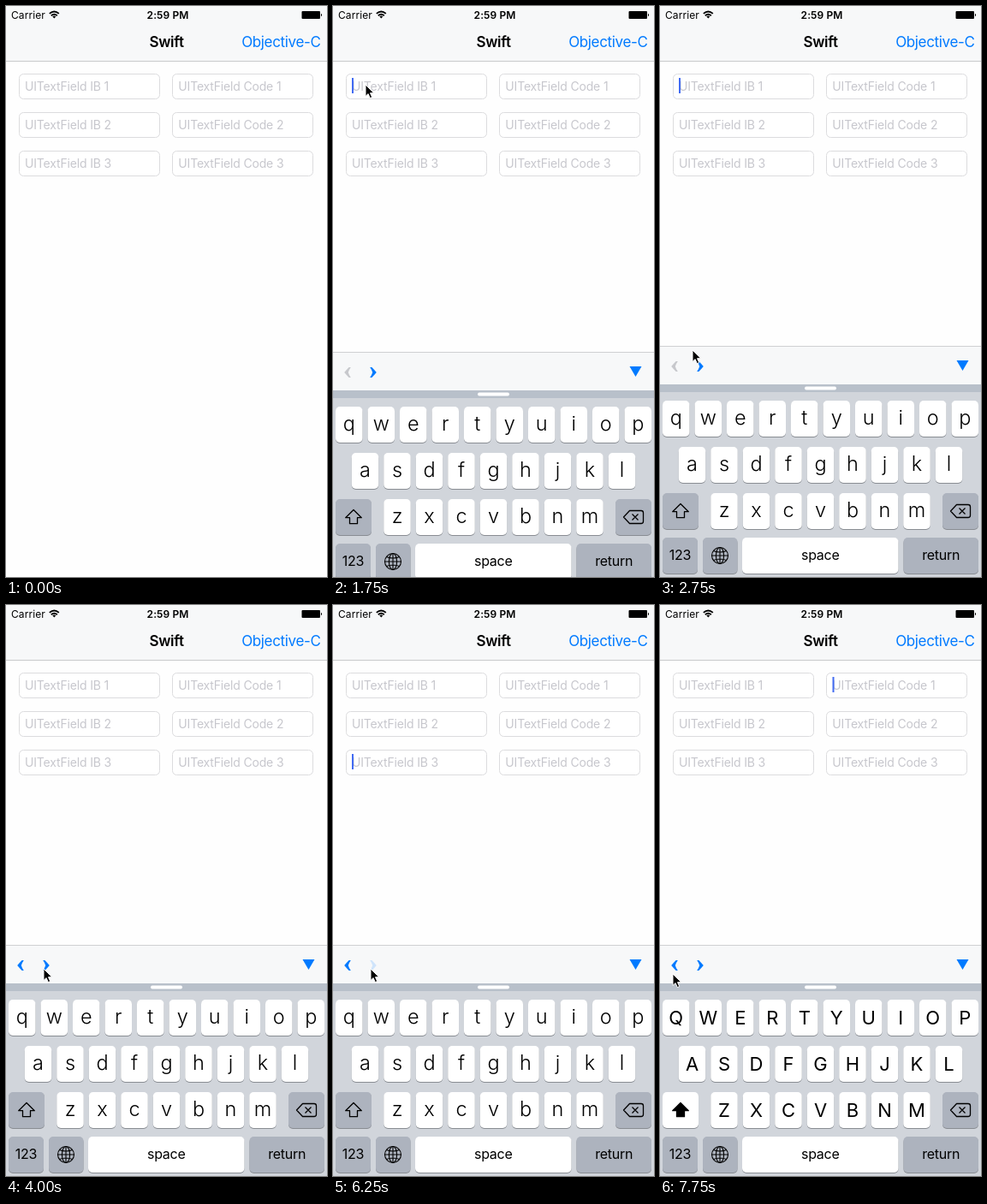
Write an HTML page that moves like this. It is 375 px wide and 667 px high and loops after 8 s.

```html
<!DOCTYPE html>
<html>
<head>
<meta charset="utf-8">
<style>
  html, body { margin: 0; width: 100%; height: 100%; overflow: hidden; background: #fff; }
  svg { display: block; width: 100vw; height: 100vh; font-family: Inter, Roboto, sans-serif; }
  .mid { text-anchor: middle; }
  .hint { font-size: 14px; letter-spacing: -.17px; fill: #c7c7cd; }
  .lower { font-size: 23.5px; font-weight: 300; }
  .upper { font-size: 22px; }
  .label { font-size: 16px; letter-spacing: -.25px; }
  .line { fill: none; stroke: #000; stroke-width: 1.3; stroke-linejoin: round; }
</style>
</head>
<body>
<svg viewBox="0 0 375 667">
  <rect width="375" height="667" fill="#fefefe"/>
  <rect width="375" height="64" fill="#f7f8f9"/>
  <rect y="64" width="375" height="1" fill="#c9cacb"/>
  <text x="6" y="14.5" font-size="12" letter-spacing=".1">Carrier</text>
  <g fill="none" stroke="#000" stroke-width="1.9">
    <path d="M50.8 8.9Q56.3 4.2 61.8 8.9M52.8 11.2Q56.3 8.3 59.8 11.2"/>
    <path d="M54.3 12.3Q56.3 10.8 58.3 12.3L56.3 14.5Z" fill="#000" stroke="none"/>
  </g>
  <text x="189" y="14.5" font-size="12" font-weight="600" letter-spacing=".1" class="mid">2:59 PM</text>
  <rect x="345.5" y="6" width="21.5" height="9" rx="1" fill="#000"/>
  <path d="M368 9h.6q1 1.5 0 3h-.6z"/>
  <text x="187.5" y="48" font-size="17" font-weight="600" letter-spacing="-.3" class="mid">Swift</text>
  <text x="367.5" y="48" font-size="17" letter-spacing="-.35" fill="#007aff" text-anchor="end">Objective-C</text>
  <g id="fields"></g>
  <rect id="caret" width="2" height="18" fill="#426bf2"/>
  <g id="board">
    <rect y="397" width="375" height="46" fill="#f7f8f9"/>
    <rect y="397" width="375" height="1" fill="#cfd0d2"/>
    <path id="prev" d="M18.6 415h2.2q-2.2 3.2-3 6q.8 2.800 3 6h-2.200q-3.200-3.400-5.400-6q2.200-2.600 5.400-6z"/>
    <path id="next" d="M45.400 415h-2.200q2.200 3.200 3 6q-.8 2.800-3 6h2.200q3.200-3.400 5.400-6q-2.200-2.600-5.400-6z"/>
    <path d="M346.500 414h14l-7 12z" fill="#007aff"/>
    <rect y="442" width="375" height="225" fill="#d1d5db"/>
    <rect y="442" width="375" height="9" fill="#b8c0ca"/>
    <rect x="169" y="444.500" width="37" height="4" rx="2" fill="#fff"/>
    <g id="keys"></g>
    <path id="shift" class="line" d="M24 581.500l9.300 9.200h-4.800v7h-9v-7h-4.800z"/>
    <path class="line" d="M346.500 582.500h13.500q2.500 0 2.500 2.500v10q0 2.500-2.500 2.500h-13.500l-7-7.500zM349.500 586.500l7 7m0-7l-7 7"/>
    <g class="line" style="stroke-width:1.100">
      <circle cx="70" cy="642" r="9.500"/>
      <ellipse cx="70" cy="642" rx="4.600" ry="9.500"/>
      <path d="M70 632.500v19M60.500 642h19M62.500 636.500q7.500 3 15 0M62.500 647.500q7.500-3 15 0"/>
    </g>
  </g>
  <path id="pointer" d="M0 0v13.500l3.100-2.900 2.200 5 2.400-1-2.200-4.900h4.300z" stroke="#fff" stroke-width="1"/>
</svg>
<script>
const $ = id => document.getElementById(id);
const STEP = 250, LOOP = 8000, BLUE = '#007aff', GREY = '#c7c8cc';

const fieldY = row => 79 + 45 * row;
let html = '';
['IB', 'Code'].forEach((kind, col) => {
  const x = col ? 194.5 : 15.5;
  for (let row = 0; row < 3; row++) {
    html += `<rect x="${x}" y="${fieldY(row) + .5}" width="164" height="29" rx="5" fill="#fff" stroke="#dcdcde"/>
      <text class="hint" x="${col ? 201.3 : 22}" y="${fieldY(row) + 19.5}">UITextField ${kind} ${row + 1}</text>`;
  }
});
$('fields').innerHTML = html;

const key = (x, y, w, fill, id = '') =>
  `<rect x="${x}" y="${y + 1}" width="${w}" height="42" rx="5" fill="#898d93"/>
   <rect id="${id}" x="${x}" y="${y}" width="${w}" height="42" rx="5" fill="${fill}"/>`;

html = '';
[['qwertyuiop', 3], ['asdfghjkl', 21.75], ['zxcvbnm', 59.25]].forEach(([letters, left], row) => {
  const y = 461 + 54 * row;
  [...letters].forEach((ch, i) => {
    const x = left + 37.5 * i;
    html += key(x, y, 31.5, '#fff') +
      `<text class="mid lower" x="${x + 15.75}" y="${y + 27.5}">${ch}</text>
       <text class="mid upper" x="${x + 15.75}" y="${y + 29}">${ch.toUpperCase()}</text>`;
  });
});
const DARK = '#adb3be';
html += key(3, 569, 42, DARK, 'shiftKey') + key(330, 569, 42, DARK);
[[3, 41, DARK, '123'], [50, 40.5, DARK, ''], [96, 182.5, '#fff', 'space'], [284.5, 87.5, DARK, 'return']]
  .forEach(([x, w, fill, label]) => {
    html += key(x, 621, w, fill) + `<text class="mid label" x="${x + w / 2}" y="647">${label}</text>`;
  });
$('keys').innerHTML = html;
const lower = document.querySelectorAll('.lower'), upper = document.querySelectorAll('.upper');

// Pointer stops: time, x, y
const stops = [
  [750, 12, 83], [1000, 38, 92], [2250, 38, 160], [2500, 38, 330], [2750, 38, 402],
  [3000, 42, 418], [3250, 44, 425], [7000, 41, 425], [7250, 32, 426], [7500, 21, 429], [7750, 15, 431]
];
// Focus changes: time, caret x, field row
const focuses = [[1750, 22, 0], [3500, 22, 1], [5000, 22, 2], [6500, 201.5, 0]];
const presses = [3250, 4750, 6250];
const blink = [1, 1, 0, .1];
const latest = (list, t) => list.filter(item => item[0] <= t).pop();
const show = (el, on) => el.style.display = on ? '' : 'none';

function draw(t) {
  t = Math.floor(t / STEP) * STEP;
  const stop = latest(stops, t), focus = latest(focuses, t);
  show($('pointer'), stop);
  if (stop) $('pointer').setAttribute('transform', `translate(${stop[1]} ${stop[2]})`);

  show($('board'), focus);
  show($('caret'), focus);
  if (!focus) return;
  const [start, x, row] = focus;
  $('caret').setAttribute('x', x);
  $('caret').setAttribute('y', fieldY(row) + 5);
  $('caret').setAttribute('opacity', blink[(t - start) / STEP % 4]);

  $('board').setAttribute('transform', `translate(0 ${t < 2000 ? 7 : 0})`);
  $('prev').setAttribute('fill', t < 3500 ? GREY : BLUE);
  $('next').setAttribute('fill', presses.includes(t) ? '#cfe4fb' : BLUE);

  const caps = t >= 6500;
  lower.forEach(el => show(el, !caps));
  upper.forEach(el => show(el, caps));
  $('shiftKey').setAttribute('fill', caps ? '#fff' : DARK);
  $('shift').style.fill = caps ? '#000' : 'none';
}

const begin = performance.now();
function tick() {
  draw((performance.now() - begin) % LOOP);
  requestAnimationFrame(tick);
}
draw(0);
requestAnimationFrame(tick);
</script>
</body>
</html>
```
